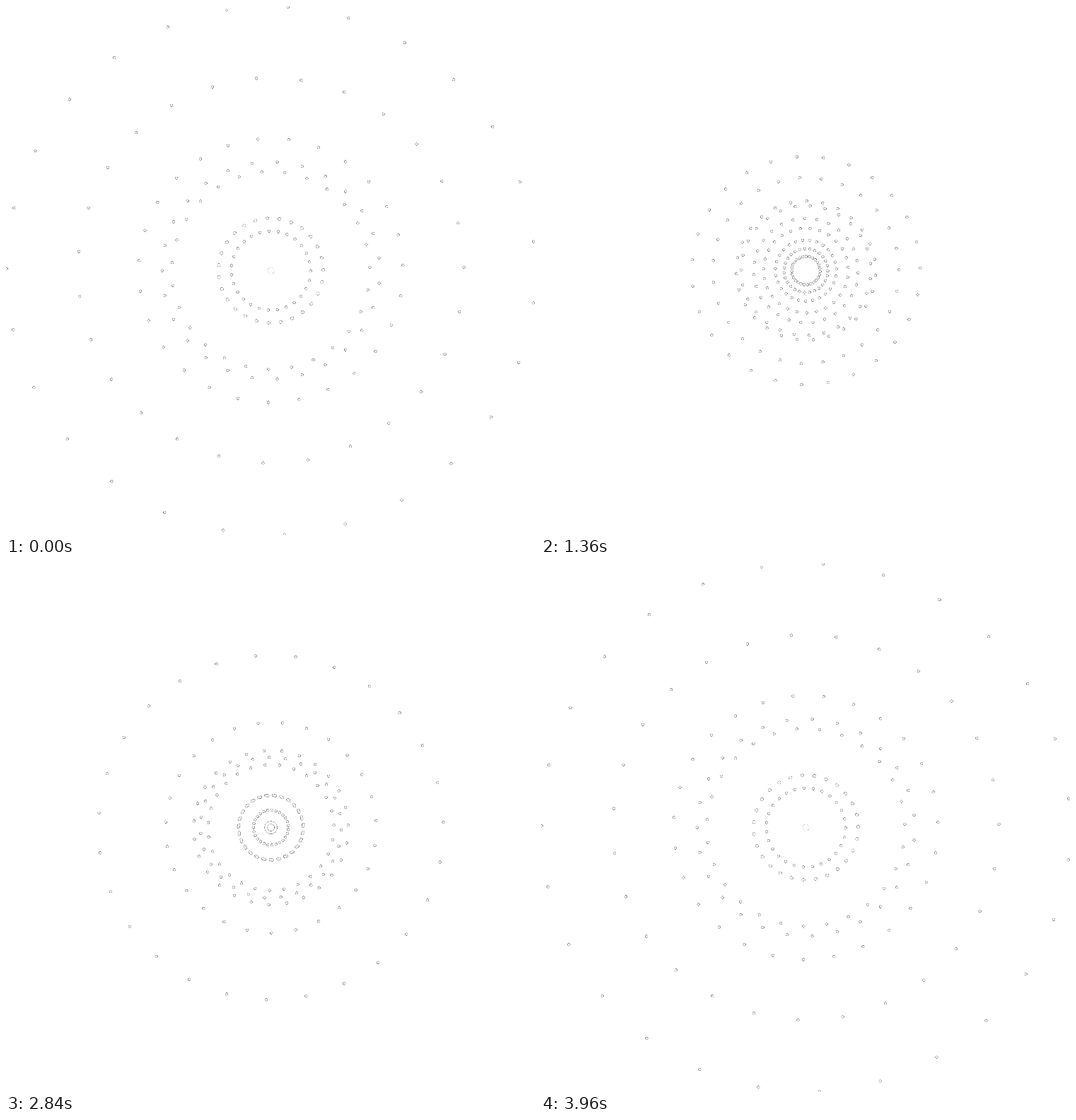
These frames come from a looping animation (748 by 749 pixels, 4000 ms). An HTML page:

```html
<!DOCTYPE html>
<html lang="en">
<head>
<meta charset="utf-8">
<title>Ring dots</title>
<style>
  html, body { margin: 0; width: 100%; height: 100%; overflow: hidden; background: #fff; }
  svg { display: block; width: 748px; height: 749px; }
  circle { animation: drift 4s ease infinite; }
  @keyframes drift {
    0%, 100% { transform: translate(var(--wide)); }
    50% { transform: translate(var(--tight)); }
  }
</style>
</head>
<body>
<svg viewBox="0 0 748 749">
  <!-- Keeps only the soft edge pixels, so touching dots share one faint outline. -->
  <filter id="edge" filterUnits="userSpaceOnUse" x="0" y="0" width="748" height="749">
    <feComponentTransfer><feFuncA type="table" tableValues="0 0 .55 .25 0"/></feComponentTransfer>
  </filter>
  <g filter="url(#edge)"><g id="stage" transform="translate(374.6 374.6)"></g></g>
</svg>
<script>
  const COPIES = 27;
  const DOT_RADIUS = 2;

  // One spoke, from the inside out: wide radius, wide angle, tight angle (degrees from the top).
  const SPOKE = [
    [2.5, -69, 1], [154, -90, 3.6], [74, 129, 1.8],
    [74, -123.6, -3.5], [140, 128, 6], [56, 144, 2.3],
    [187, -165.6, 2.2], [374, 123.7, 0.2], [273, -151, -1.2]
  ];

  // The gaps between the tight rings widen twice on the way out.
  const tightRadius = k =>
    21.5 + 10.5 * k + 6.9 * Math.max(0, k - 1) + 18.3 * Math.max(0, k - 6);

  const make = (name, attrs, parent) => {
    const node = document.createElementNS('http://www.w3.org/2000/svg', name);
    for (const key in attrs) node.setAttribute(key, attrs[key]);
    return parent.appendChild(node);
  };

  const offset = (radius, degrees) => {
    const a = degrees * Math.PI / 180;
    return `${(radius * Math.sin(a)).toFixed(3)}px, ${(-radius * Math.cos(a)).toFixed(3)}px`;
  };

  const stage = document.getElementById('stage');
  for (let i = 0; i < COPIES; i++) {
    const arm = make('g', { transform: `rotate(${i * 360 / COPIES})` }, stage);
    SPOKE.forEach(([radius, wideAngle, tightAngle], k) => make('circle', {
      r: DOT_RADIUS,
      style: `--wide: ${offset(radius, wideAngle)}; --tight: ${offset(tightRadius(k), tightAngle)}`
    }, arm));
  }
</script>
</body>
</html>
```
